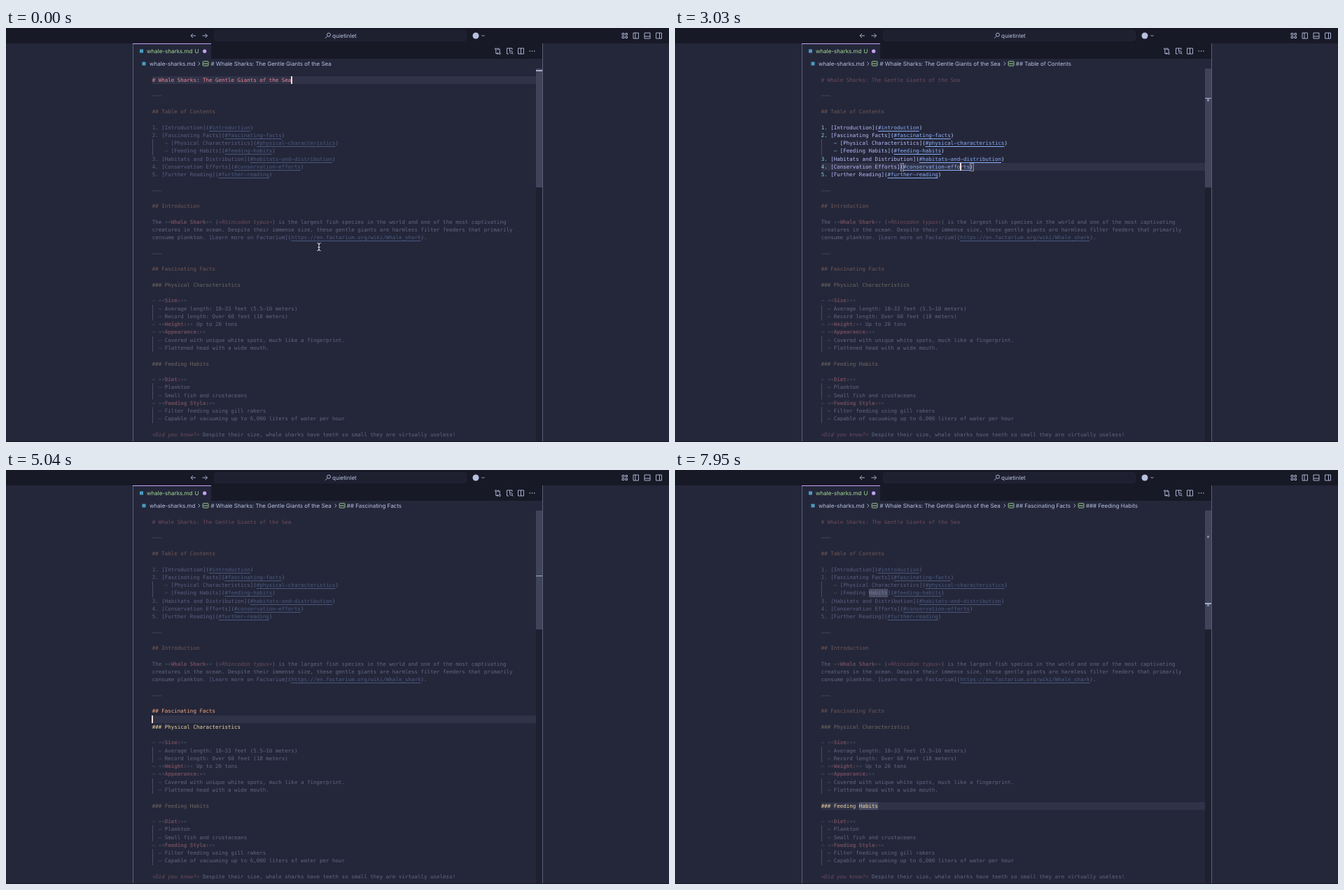
Animation, 947 px wide and 592 px high, one loop 8 s. Source, as an HTML page:

```html
<!DOCTYPE html>
<html lang="en">
<head>
<meta charset="utf-8">
<title>Editor focus</title>
<style>
  html, body { margin: 0; width: 100%; height: 100%; overflow: hidden; background: #24273a; }
  body { position: relative; text-rendering: geometricPrecision; color: #cad3f5; }
  svg, div { position: absolute; }
  #chrome { left: 0; top: 0; }
  #chrome text, #crumbs { font: 8px Inter, sans-serif; }
  #crumbs { left: 205px; top: 45px; height: 12px; line-height: 12px; white-space: pre; display: flex; color: #b8c0e0; }
  #crumbs svg { position: static; flex: none; }
  .row { left: 208.7px; height: 11.267px; line-height: 11.267px; white-space: pre;
         font-family: "DejaVu Sans Mono", monospace; font-size: 7.51px; opacity: .37; }
  .row.on { opacity: 1; }
  .h1, b, i { color: #ed8796; }
  .h2 { color: #f5a97f; }
  .h3 { color: #eed49f; }
  .mark { color: #8bd5ca; }
  .star { color: #939ab7; }
  .label { color: #b7bdf8; }
  u { color: #8aadf4; text-underline-offset: 1.8px; text-decoration-thickness: 1px; }
  .guide { left: 208.7px; width: 1px; background: #494d64; }
  #line { left: 208.7px; width: 548.3px; height: 11.267px; background: #303347; }
  #caret { width: 1.4px; height: 11.267px; background: #f4dbd6; }
  .pair { width: 3.6px; height: 10.2px; border: .7px solid #8087a2; background: #8087a233; }
  .word { width: 27.1px; height: 11.267px; background: #494d64; }
  #here { left: 757px; width: 9px; height: 1.3px; background: #a5adcb; }
  .tick { left: 760px; width: 3px; height: 3.4px; background: #8087a2; }
</style>
</head>
<body>
<svg id="chrome" width="947" height="592" fill="none" stroke-width=".9">
  <path fill="#181926" d="M0 0H947V22H0zM293 22H766V44H293zM0 591H947V592H0z"/>
  <rect x="297.5" y="3.5" width="360" height="15" rx="3.5" fill="#1e2030" stroke="#222539"/>
  <path fill="#1e2030" d="M757 58H766V591H757z"/>
  <path fill="#3f4459" d="M757 58H766V228H757z"/>
  <path stroke="#5b6078" stroke-width="1" d="M181.5 22V591M766.5 22V591"/>
  <path stroke="#c6a0f6" stroke-width="1" d="M181 22.5H293"/>
  <g stroke="#b8c0e0">
    <path d="M271 11H264M267 8L264 11L267 14M280.500 11H287.500M284.500 8L287.500 11L284.500 14"/>
    <circle cx="461" cy="9.700" r="2.500"/><path d="M459.200 11.500L456 14.700"/>
    <path d="M679.500 10L681.500 12L683.500 10"/>
    <path d="M880 7.500H883V10H880zM880 12H883V14.500H880zM885 7.500H887.500V10H885zM885 12H887.500V14.500H885z"/>
    <path d="M896 7H903.500V15H896zM899 7V15M912 7H920V15H912zM912 12H920M928.500 7H936.500V15H928.500zM933.500 7V15"/>
    <circle cx="699.800" cy="30" r="1.200"/><circle cx="705.200" cy="36.500" r="1.200"/>
    <path d="M699.800 31.500V36.500H703M701.500 35L703 36.500L701.500 38M705.200 35V30H702M703.500 28.500L702 30L703.500 31.500"/>
    <path d="M723 29H715.500V37H718M719.500 29V33M723 29V31"/><circle cx="721.500" cy="34.500" r="1.800"/><path d="M722.800 35.800L724.500 37.500"/>
    <path d="M731.500 29H739.500V37H731.500zM735.500 29V37"/>
  </g>
  <g fill="#b8c0e0">
    <circle cx="671" cy="11" r="4.500"/>
    <circle cx="748.200" cy="33" r=".8"/><circle cx="751.500" cy="33" r=".8"/><circle cx="754.800" cy="33" r=".8"/>
    <text x="466" y="13.900">quietinlet</text>
  </g>
  <g fill="#a6da95"><text x="201" y="35.900">whale-sharks.md</text><text x="269.500" y="35.900">U</text></g>
  <circle cx="283.700" cy="33.200" r="2.600" fill="#c6a0f6"/>
  <path fill="#4a9cc0" d="M191 30.500H196V35.500H191zM194.500 48.500H199.500V53.500H194.500z"/>
</svg>
<div id="crumbs"></div>
<div id="line"></div>
<script>
const TEXT = `# Whale Sharks: The Gentle Giants of the Sea

---

## Table of Contents

1. [Introduction](#introduction)
2. [Fascinating Facts](#fascinating-facts)
    - [Physical Characteristics](#physical-characteristics)
    - [Feeding Habits](#feeding-habits)
3. [Habitats and Distribution](#habitats-and-distribution)
4. [Conservation Efforts](#conservation-efforts)
5. [Further Reading](#further-reading)

---

## Introduction

The **Whale Shark** (*Rhincodon typus*) is the largest fish species in the world and one of the most captivating
creatures in the ocean. Despite their immense size, these gentle giants are harmless filter feeders that primarily
consume plankton. [Learn more on Factarium](https://en.factarium.org/wiki/Whale_shark).

---

## Fascinating Facts

### Physical Characteristics

- **Size:**
  - Average length: 18-33 feet (5.5-10 meters)
  - Record length: Over 60 feet (18 meters)
- **Weight:** Up to 20 tons
- **Appearance:**
  - Covered with unique white spots, much like a fingerprint.
  - Flattened head with a wide mouth.

### Feeding Habits

- **Diet:**
  - Plankton
  - Small fish and crustaceans
- **Feeding Style:**
  - Filter feeding using gill rakers
  - Capable of vacuuming up to 6,000 liters of water per hour

*Did you know?* Despite their size, whale sharks have teeth so small they are virtually useless!`.split('\n');

const LOOP = 8000, LEFT = 208.7, TOP = 68.9, PITCH = 11.267, CHAR = 4.521, COLUMN = 44;
// Time at which the caret reaches each successive row.
const MOVES = [0, 840, 1320, 1740, 1860, 1980, 2100, 2340, 2550, 2790, 2880, 2970, 3060,
  3300, 3420, 3510, 3810, 3960, 4110, 4500, 4590, 4670, 4750, 4840, 4920, 5010, 5130,
  5340, 5640, 5940, 6150, 6420, 6600, 6840, 7170, 7380, 7440];
const PAIR_LAG = 25, PANEL_LAG = 60, WORD_TIME = 7690;

const $ = id => document.getElementById(id);
const rowY = n => TOP + n * PITCH;
const colX = c => LEFT + c * CHAR;
const tickY = n => 61 + n * 3.61;
const rowAt = t => Math.max(0, MOVES.filter(m => m <= t).length - 1);
const colAt = row => Math.min(COLUMN, TEXT[row].length);

function add(cls, x, y, html = '') {
  const el = document.createElement('div');
  el.className = cls;
  if (x !== null) el.style.left = x + 'px';
  el.style.top = y + 'px';
  el.innerHTML = html;
  document.body.append(el);
  return el;
}
const show = (el, on) => { el.style.visibility = on ? 'visible' : 'hidden'; };
const place = (el, x, y) => { el.style.left = x + 'px'; el.style.top = y + 'px'; };
const span = (cls, s) => `<span class="${cls}">${s}</span>`;

function paint(s) {
  const head = s.match(/^#+/);
  if (head) return span('h' + head[0].length, s);
  if (s === '---') return span('mark', s);
  return s.replace(/\*\*(.+?)\*\*|(\*.+?\*)|(\[.+?\])\((.+?)\)|^( *)(-|\d\.)(?= )/g,
    (all, bold, ital, label, url, pad, mark) =>
      bold ? span('star', '**') + `<b>${bold}</b>` + span('star', '**') :
      ital ? `<i>${ital}</i>` :
      label ? span('label', label) + `(<u>${url}</u>)` :
      pad + span('mark', mark));
}
// Wide dashes and centred asterisks.
const glyphs = html => html.replace(/-/g, '\u2013').replace(/\*/g, '\u2217');

const words = [[9, 15], [36, 12]].map(([n, c]) => add('word', colX(c), rowY(n)));
const wordTicks = [9, 36].map(n => add('tick', null, tickY(n) + .4));
TEXT.forEach((s, n) => { if (/^ +-/.test(s)) add('guide', null, rowY(n)).style.height = PITCH + 'px'; });
const pairs = [0, 1].map(() => add('pair', 0, 0));
const rows = TEXT.map((s, n) => add('row', null, rowY(n), glyphs(paint(s))));
const pairTick = add('tick', null, 0);
const here = add('', null, 0);
here.id = 'here';
const caret = add('', 0, 0);
caret.id = 'caret';
const pointer = add('', 443, 307,
  '<svg width="9" height="12" fill="none" stroke="#e6e6ee"><path d="M1.500 .5Q4 .5 4 2.500Q4 .5 6.500 .5M4 2V10M1.500 11.500Q4 11.500 4 9.500Q4 11.500 6.500 11.500M2.500 6.500H5.500"/></svg>');

const SEP = `<svg width="22" height="12" fill="none" stroke-width=".9">
  <path stroke="#a5adcb" d="M4.500 3.500L7 6L4.500 8.500"/>
  <rect x="11.200" y="2.700" width="7.800" height="6.400" rx="1" stroke="#a6da95"/>
  <path stroke="#a6da95" stroke-dasharray="1.300 .6" stroke-width="1.400" d="M12.500 6H18"/></svg>`;

function crumbs(row) {
  const path = [];
  for (const s of TEXT.slice(0, row + 1)) {
    const head = s.match(/^#+/);
    if (head) path.splice(head[0].length - 1, 9, s);
  }
  return ['whale-sharks.md', ...path].map(s => `<span>${s}</span>`).join(SEP);
}

// The block around a row runs to the nearest blank rows beyond it.
function block(row) {
  let from = row, to = row;
  while (TEXT[from - 1]) from--;
  while (TEXT[to + 1]) to++;
  return [from, to];
}

// The parentheses that touch or enclose the caret on a row.
const parens = row => [...TEXT[row].matchAll(/\([^)]*\)/g)]
  .find(m => m.index <= colAt(row) && colAt(row) <= m.index + m[0].length);

let lastCrumbs;
function draw(t) {
  const row = rowAt(t), [from, to] = block(row);
  rows.forEach((el, n) => el.classList.toggle('on', n >= from && n <= to));
  $('line').style.top = rowY(row) + 'px';
  here.style.top = tickY(row) - .6 + 'px';
  place(caret, colX(colAt(row)) - .5, rowY(row));
  show(caret, !(t >= 390 && t < 840) && t < 7950);
  show(pointer, t < 60);

  const pairRow = rowAt(t - PAIR_LAG), hit = parens(pairRow);
  pairs.forEach((el, k) => {
    show(el, hit);
    if (hit) place(el, colX(hit.index + k * (hit[0].length - 1)) - .2, rowY(pairRow));
  });

  const panelRow = rowAt(t - PANEL_LAG);
  pairTick.style.top = tickY(panelRow) + .4 + 'px';
  show(pairTick, parens(panelRow));
  [...words, ...wordTicks].forEach(el => show(el, t >= WORD_TIME));

  const html = crumbs(panelRow);
  if (html !== lastCrumbs) $('crumbs').innerHTML = lastCrumbs = html;
}

const start = performance.now();
function tick() {
  draw((performance.now() - start) % LOOP);
  requestAnimationFrame(tick);
}
tick();
</script>
</body>
</html>
```
